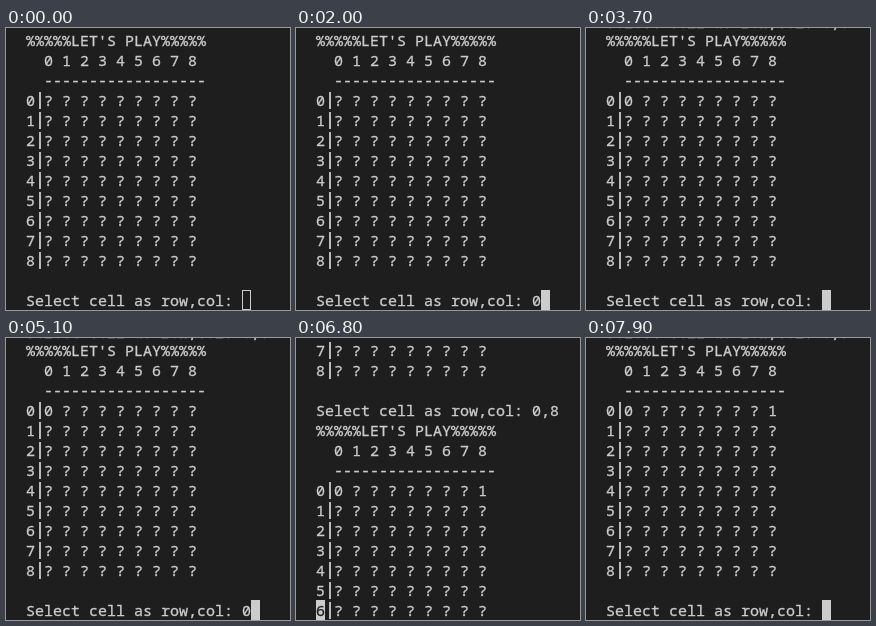
An HTML page for the animation above (8000 ms loop, 284 by 282 pixels).

```html
<!DOCTYPE html>
<html lang="en">
<head>
<meta charset="utf-8">
<title>Grid game in a terminal</title>
<style>
  html, body { margin: 0; width: 100%; height: 100%; overflow: hidden; background: #1e1e1e; }
  #term {
    position: relative; width: 284px; height: 282px; overflow: hidden;
    font: 15px/20px "Noto Sans Mono", "DejaVu Sans Mono", monospace;
    color: #ccc; white-space: pre; -webkit-text-stroke: .3px;
  }
  #above, #screen, #cursor { position: absolute; left: 20px; margin: 0; font: inherit; }
  #above { top: -16px; }
  #screen { top: 2px; }
  #screen b { font-weight: inherit; color: transparent; background: linear-gradient(#bbb, #bbb) 4px 50% / 2px 17px no-repeat; }
  #cursor { box-sizing: border-box; width: 9px; height: 20px; background: #ccc; color: #1e1e1e; }
  #cursor.idle { background: none; border: 1px solid #ccc; }
</style>
</head>
<body>
<div id="term"><div id="above"></div><pre id="screen"></pre><div id="cursor"></div></div>
<script>
const LOOP = 8000, CELL = 9, LINE = 20, LAST = 13;
const PROMPT = 'Select cell as row,col: ';
const above = document.getElementById('above');
const screen = document.getElementById('screen');
const cursor = document.getElementById('cursor');
const digits = [...'012345678'];

function board(open) {
  const rows = digits.map(r => r + '|' + digits.map(c => open[r + c] || '?').join(' '));
  return ["%%%%%LET'S PLAY%%%%%", '  ' + digits.join(' '), '  ' + '-'.repeat(18), ...rows, ''];
}

const first = board({});
const second = board({ '00': '0' });
const third = board({ '00': '0', '08': '1' });
const ask = (lines, typed = '') => [...lines, PROMPT + typed];
const printing = [...second.slice(10), PROMPT + '0,8', ...third.slice(0, 10)];

// "past" is the answered prompt whose lower edge shows above the board.
const steps = [
  { at: 0, view: ask(first), idle: true },
  { at: 1100, view: ask(first) },
  { at: 2000, view: ask(first, '0') },
  { at: 2400, view: ask(first, '0,') },
  { at: 2900, view: ask(first, '0,0') },
  { at: 3700, view: ask(second), past: '0,0' },
  { at: 5100, view: ask(second, '0'), past: '0,0' },
  { at: 5700, view: ask(second, '0,'), past: '0,0' },
  { at: 6300, view: ask(second, '0,8'), past: '0,0' },
  { at: 6800, view: printing, col: 0 },
  { at: 6900, view: ask(third), past: '0,8' }
];

let shown;
function draw({ view, past, idle, col = view[LAST].length }) {
  above.textContent = past ? PROMPT + past : '';
  screen.innerHTML = view.join('\n').replaceAll('|', '<b>|</b>');
  cursor.className = idle ? 'idle' : '';
  cursor.textContent = view[LAST][col] || '';
  cursor.style.left = 20 + col * CELL + 'px';
  cursor.style.top = 2 + LAST * LINE + 'px';
}

const start = performance.now();
function tick() {
  const t = (performance.now() - start) % LOOP;
  const step = steps.findLast(s => s.at <= t);
  if (step !== shown) draw(shown = step);
  requestAnimationFrame(tick);
}
tick();
</script>
</body>
</html>
```
